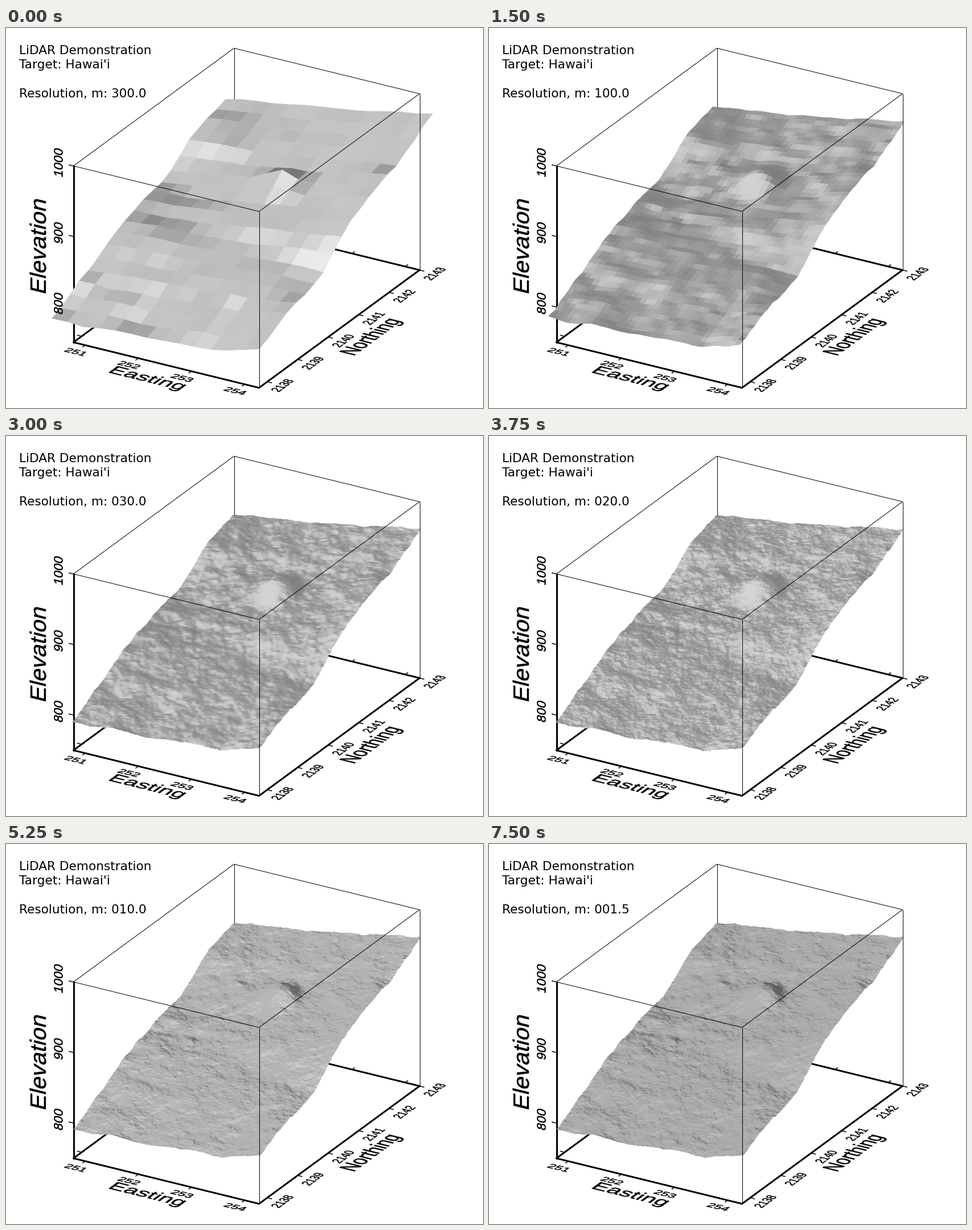
Animation of 838x668 px, one loop 8250 ms. Source, as a matplotlib script:

```python
import numpy as np
import matplotlib.pyplot as plt
from matplotlib.animation import FuncAnimation
from matplotlib.patches import PathPatch
from matplotlib.textpath import TextPath
from matplotlib.transforms import Affine2D

W, H, DPI = 838, 668, 100
PX = 72 / DPI
plt.rcParams["font.family"] = "Liberation Sans"

# Map box: origin, extent in km, and screen vectors per ground unit
ORIGIN = np.array([118.5, 552.5])
E0, N0, WIDTH, DEPTH = 250.78, 2137.73, 3.49, 5.27
KM_E = np.array([326, 80]) / WIDTH
KM_N = np.array([282, -207]) / DEPTH
TALL = np.array([0, -310])
SCALE = 107.7
EX, EY, EZ = KM_E / SCALE, KM_N / SCALE, np.array([0, -0.906])

RESOLUTIONS = [300, 200, 100, 50, 30, 20, 15, 10, 5, 3, 1.5]
SOFT = {200, 100, 30, 20, 15}
FINEST = 14

fig = plt.figure(figsize=(W / DPI, H / DPI), dpi=DPI, facecolor="white")
ax = fig.add_axes([0, 0, 1, 1])
ax.set_xlim(0, W)
ax.set_ylim(H, 0)
ax.axis("off")


# ---------- terrain ----------
def profile(u, *rises):
    """Deviation from a straight edge, given at even steps along it."""
    return np.interp(u, np.linspace(0, 1, len(rises) + 2), [0, *rises, 0])


def ground(x, y):
    """Ground position in km that lies under a screen point of the slope."""
    x, y = x - 118, y - 500
    t = (.141 * x - y) / 411.8
    return (x - 282 * t) / 326 * WIDTH, t * DEPTH


# Main slopes facing the light (+) or away from it (-): x, y, rise, radius
SLOPES = [(462, 290, 8, .28), (485, 218, 7, .25), (445, 372, 7, .28),
          (290, 457, 7, .35), (330, 340, -6, .14), (412, 235, -6, .13),
          (510, 272, -8, .2)]


def noise(e, n, cell, seed):
    knots = np.random.default_rng(seed).uniform(
        -1, 1, (int(5 / cell) + 3, int(7 / cell) + 3))
    x, y = (e + .5) / (1.4 * cell), (n + .5) / cell
    i, j = x.astype(int), y.astype(int)
    u, v = x - i, y - j
    u, v = u * u * (3 - 2 * u), v * v * (3 - 2 * v)
    near = knots[i, j] * (1 - u) + knots[i + 1, j] * u
    far = knots[i, j + 1] * (1 - u) + knots[i + 1, j + 1] * u
    return near * (1 - v) + far * v


def height(e, n, cell):
    """Terrain height in pixels above the floor of the box."""
    s, t = e / WIDTH, n / DEPTH
    h = 52 + 34 * s + 155 * t + 21 * s * t
    s, t = np.clip(s, 0, 1), np.clip(t, 0, 1)
    h += (1 - s) ** 4 * profile(t, 5, 9, 6, -5, 8)
    h += s ** 4 * profile(t, -4, -16, 5, 3, -3)
    h += (1 - t) ** 4 * profile(s, 0, -7, -6, -14)
    h += t ** 4 * profile(s, -3, -5, -5, -3)

    # A ledge climbs from the west edge to the cone and falls to the north
    u = (t - .41 - .67 * np.minimum(s, .47)) / .04
    h -= 5 * u * np.exp(-u ** 2) / (1 + np.exp((s - .65) / .03))
    ce, cn = ground(478, 264)
    h += 15 * np.exp(-((e - ce) ** 2 + (n - cn) ** 2) / .3 ** 2)
    for x, y, rise, r in SLOPES:
        ce, cn = ground(x, y)
        de, dn = (e - ce) / r, (n - cn) / r
        h += rise * (.5 * de + .87 * dn) * np.exp(-de ** 2 - dn ** 2)

    for k in range(6):
        size = .6 / 2 ** k
        if size >= .8 * cell:
            h += 3.4 * .62 ** k * noise(e, n, size, 40 + k)
    return h


# ---------- shading ----------
def standard(a):
    return (a - a.mean()) / a.std()


def shade(toward, across, soft, progress):
    if soft:
        tone = np.tanh(.6 * toward)
        return 154 + 16 * progress + np.where(tone > 0, 52, 32) * tone
    return (192 - 24 * progress + 7 * np.tanh(toward)
            - 26 * np.clip(-toward - .6, 0, 2.5)
            + (22 - 14 * progress) * np.clip(across - .7, 0, 1.6))


def axis_nodes(top, length, cell):
    """Grid lines on whole multiples of the cell that cover the length."""
    last = np.ceil(top / cell - 1e-6)
    count = round(length / cell) + 1
    return (last - np.arange(count + 1)) * cell


def surface(i):
    res = RESOLUTIONS[i]
    cell = max(res, FINEST) / 1000
    # Rows run from back to front so that nearer facets cover farther ones
    e, n = np.meshgrid(axis_nodes(E0 + WIDTH, WIDTH, cell)[::-1] - E0,
                       axis_nodes(N0 + DEPTH, DEPTH, cell) - N0)
    h = height(e, n, cell)
    x = ORIGIN[0] + KM_E[0] * e + KM_N[0] * n
    y = ORIGIN[1] + KM_E[1] * e + KM_N[1] * n - h

    de = np.diff(h, axis=1)
    dn = -np.diff(h, axis=0)
    de = (de[1:] + de[:-1]) / 2
    dn = (dn[:, 1:] + dn[:, :-1]) / 2
    grey = shade(standard(.5 * de + .87 * dn), standard(.6 * dn - .8 * de),
                 res in SOFT, i / (len(RESOLUTIONS) - 1))
    return ax.pcolormesh(x, y, np.clip(grey, 90, 235), cmap="gray",
                         vmin=0, vmax=255, edgecolors="face", linewidth=.4,
                         antialiased=True, zorder=2)


# ---------- frame and lettering ----------
def line(p, q, width, z=1):
    ax.plot([p[0], q[0]], [p[1], q[1]], color="black", lw=width * PX,
            solid_capstyle="round", zorder=z)


def label(text, at, base, up, size):
    """Text lying in the plane of base and up, centred on its baseline."""
    path = TextPath((0, 0), text, size=size)
    box = path.get_extents()
    start = at - base * (box.x0 + box.x1) / 2
    place = Affine2D.from_values(*base, *up, *start)
    ax.add_patch(PathPatch(place.transform_path(path), fc="black",
                           ec="black", lw=.5 * PX, zorder=3))


def caption(text, baseline):
    return ax.text(23, baseline, text, family="DejaVu Sans",
                   size=21.6 * PX, va="baseline", zorder=4)


a = ORIGIN
b = a + KM_E * WIDTH
c = b + KM_N * DEPTH
d = a + KM_N * DEPTH

for p, q in ((a, b), (b, c), (a, d), (d, c), (a, a + TALL)):
    line(p, q, 3)
line(d, d + TALL, 1)
for p, q in ((a, d), (d, c)):
    line(p + TALL, q + TALL, 1)
for p, q in ((a, b), (b, c)):
    line(p + TALL, q + TALL, 1, 3)
for p in (b, c):
    line(p, p + TALL, 1, 3)

TICK, SMALL, LARGE = 9, 25, 45
for east in range(251, 255):
    off = KM_E * (east - E0)
    line(a + off, a + off - EY * TICK, 1.5)
    line(d + off, d + off + EY * TICK, 1.5)
    label(str(east), a + off - EY * 41, EX, EY, SMALL)
for north in range(2138, 2144):
    off = KM_N * (north - N0)
    line(b + off, b + off + EX * TICK, 1.5)
    line(a + off, a + off - EX * TICK, 1.5)
    label(str(north), b + off + EX * 39, EY, -EX, SMALL)
for elev in (800, 900, 1000):
    p = a + TALL * (elev - 750) / 250
    line(p, p - EX * TICK, 1.5)
    label(str(elev), p - EX * 22, EZ, -EX, SMALL)

label("Easting", (a + b) / 2 - EY * 78, EX, EY, LARGE)
label("Northing", (b + c) / 2 + EX * 78, EY, -EX, LARGE)
label("Elevation", a + TALL / 2 - EX * 56, EZ, -EX, LARGE)

caption("LiDAR Demonstration", 46)
caption("Target: Hawai'i", 71)
readout = caption("", 122)
shown = []


def update(i):
    while shown:
        shown.pop().remove()
    shown.append(surface(i))
    readout.set_text(f"Resolution, m: {RESOLUTIONS[i]:05.1f}")
    return shown + [readout]


anim = FuncAnimation(fig, update, frames=len(RESOLUTIONS), interval=750,
                     init_func=lambda: [], repeat=True, repeat_delay=0)
plt.show()
```
